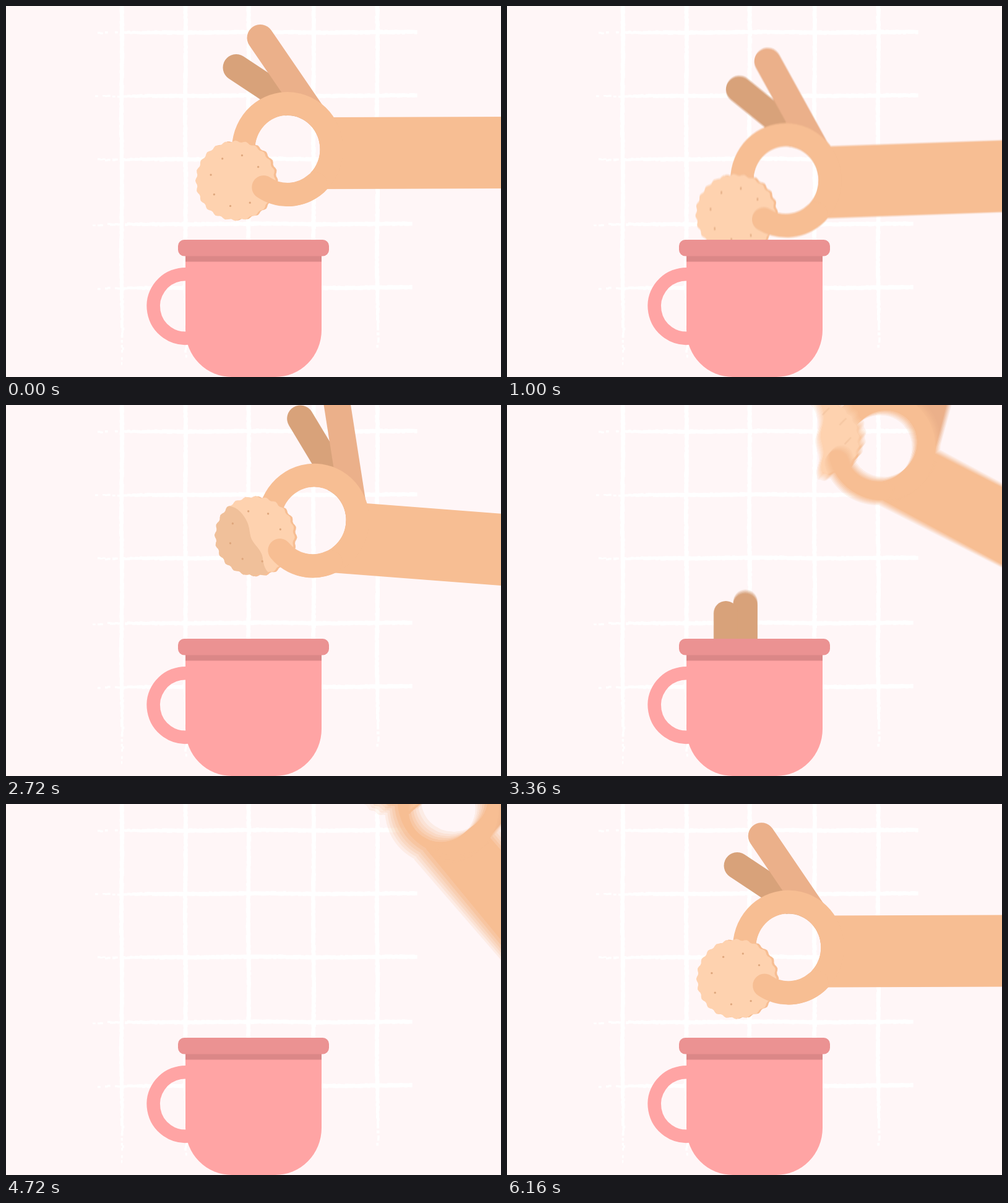
Recreate the animation shown at these times as an HTML page with a canvas. Size 800x600 px, loop 6.2 s.

```html
<!DOCTYPE html>
<html lang="en">
<head>
<meta charset="utf-8">
<title>Cookie dunk</title>
<style>
html, body { margin: 0; width: 100%; height: 100%; overflow: hidden; background: #fff6f7; }
canvas { display: block; width: 800px; height: 600px; }
</style>
</head>
<body>
<canvas id="stage" width="800" height="600"></canvas>
<script>
const LOOP = 6200, RAD = Math.PI / 180;
const SHUTTER = 18, SAMPLES = 6;
const SOAK = 1500, BREAK = 2800, SUNK = 3260, FRESH = 4000;
const COLOR = {
  bg: '#fff6f7', hand: '#f7be93', middle: '#ebb08a', pinky: '#d8a27a',
  cookie: '#fed2af', soaked: '#f0c09a', dot: '#dea67c', tea: '#d8a27a',
  mug: '#ffa4a4', rim: '#eb9292', shade: '#db8787'
};

const screen = document.getElementById('stage').getContext('2d');
const newLayer = () => {
  const c = document.createElement('canvas');
  c.width = 800;
  c.height = 600;
  return c.getContext('2d');
};
const scene = newLayer(), wall = newLayer();

// time, ring x, ring y, arm angle, hand angle, finger spread
const KEYS = [
  [0, 455, 231.5, -0.2, 0, 0],
  [560, 458, 190, 2, 1, 4],
  [1000, 451, 281.5, -2, -2.5, 8],
  [1300, 449, 339, -4, -6, 5],
  [1920, 456, 325, -3.9, -21, 3.5],
  [2000, 457, 323, -3.8, -22, 3],
  [2580, 499, 181, 5, 17.5, 11],
  [2720, 497, 187, 4.4, 16.5, 9],
  [3000, 496, 189, 4.2, 16, 9],
  [3360, 605, 67, 27.5, 40, 9],
  [3760, 930, -150, 56, 66, 4],
  [4600, 930, -150, 56, 70, 4],
  [4720, 715, 0, 50, 66, 8],
  [5100, 439, 249, -2, -4, 12],
  [5350, 449, 236, -0.5, -1, 9],
  [5900, 454, 233.5, -0.2, 0, 4]
];

const mod = (a, n) => ((a % n) + n) % n;
const keyAt = i => KEYS[mod(i, KEYS.length)];
const timeAt = i => keyAt(i)[0] + LOOP * Math.floor(i / KEYS.length);
const slope = (i, k) => (keyAt(i + 1)[k] - keyAt(i)[k]) / (timeAt(i + 1) - timeAt(i));

// Monotone tangent: flat at turning points
function tangent(i, k) {
  const a = slope(i - 1, k), b = slope(i, k);
  return a * b <= 0 ? 0 : 2 * a * b / (a + b);
}

function poseAt(t) {
  let i = KEYS.length - 1;
  while (KEYS[i][0] > t) i--;
  const h = timeAt(i + 1) - timeAt(i), u = (t - timeAt(i)) / h, v = 1 - u;
  const value = k => keyAt(i)[k] * (1 + 2 * u) * v * v + keyAt(i + 1)[k] * u * u * (3 - 2 * u)
    + h * u * v * (tangent(i, k) * v - tangent(i + 1, k) * u);
  return { x: value(1), y: value(2), arm: value(3), hand: value(4), spread: value(5) };
}

function paintWall(c) {
  let seed = 7;
  const rnd = () => (seed = seed * 16807 % 2147483647) / 2147483647;
  c.fillStyle = COLOR.bg;
  c.fillRect(0, 0, 800, 600);
  c.fillStyle = '#fff';
  // Dry brush stroke that thins out towards position `from`
  const brush = (from, to, dab) => {
    const dir = Math.sign(to - from);
    for (let p = from; (to - p) * dir > 0; p += 4 * dir) {
      const f = Math.min(1, Math.abs(p - from) / 130);
      const size = 6 * (0.25 + 0.75 * f) + rnd() * 1.4;
      const off = (rnd() - 0.5) * (2.6 - 1.8 * f) + Math.sin(p / 37) * 0.5;
      if (rnd() < 0.2 + f * 1.6) dab(p, off - size / 2, size, 1 - f);
    }
  };
  [43, 145.5, 248, 353, 456].forEach((y, i) =>
    brush(132, i < 3 ? 662 : 656, (p, o, s, fade) => c.fillRect(p, y + o + fade * 2 - 0.5, 4.6, s)));
  [187, 290, 392, 497, 600].forEach(x =>
    brush(576, -6, (p, o, s, fade) => c.fillRect(x + o + fade, p, s, 4.6)));
}

const hole = new Path2D();
hole.rect(-2000, -2000, 4000, 4000);
hole.ellipse(0, 0, 52.5, 54.5, 0, 0, 7);

const biscuit = new Path2D();
for (let a = 0; a < 360; a += 3) {
  const r = 63.6 + 1.4 * Math.cos(24 * a * RAD);
  biscuit.lineTo(r * Math.cos(a * RAD), r * Math.sin(a * RAD));
}
biscuit.closePath();

const biteLine = 'M-51 -35C-38 -37 -19 -24 -12 -9S-4 7 9 16S22 30 25.6 37S34 49 40 51L46 58';
const soakedSide = new Path2D(biteLine + 'L30 110H-110V-35Z');
const drySide = new Path2D(biteLine + 'L120 110V-110H-70Z');

function within(c, fn) {
  c.save();
  fn();
  c.restore();
}

function line(c, color, width, x1, y1, x2, y2) {
  c.strokeStyle = color;
  c.lineWidth = width;
  c.lineCap = 'round';
  c.beginPath();
  c.moveTo(x1, y1);
  c.lineTo(x2, y2);
  c.stroke();
}

function finger(c, color, px, py, dx, dy, spread) {
  within(c, () => {
    c.translate(px, py);
    c.rotate(spread * RAD);
    line(c, color, 43, 0, 0, dx, dy);
  });
}

function handArc(c, from, to) {
  c.strokeStyle = COLOR.hand;
  c.lineWidth = 38;
  c.lineCap = 'round';
  c.beginPath();
  c.ellipse(0, 0, 71, 73.5, 0, from * RAD, to * RAD);
  c.stroke();
}

function placeHand(c, p) {
  c.translate(p.x, p.y);
  c.rotate(p.hand * RAD);
}

function cookie(c, side, soaked) {
  within(c, () => {
    if (side) c.clip(side);
    c.fillStyle = COLOR.hand;
    c.translate(2.6, -0.6);
    c.fill(biscuit);
    c.translate(-3.6, 0.6);
    c.fillStyle = COLOR.cookie;
    c.fill(biscuit);
    if (soaked) within(c, () => {
      c.clip(biscuit);
      c.fillStyle = COLOR.soaked;
      c.fill(soakedSide);
    });
    c.fillStyle = COLOR.dot;
    for (let i = 0; i < 8; i++) {
      const a = (45 * i - 77) * RAD;
      c.beginPath();
      c.arc(1 + 42 * Math.cos(a), 42 * Math.sin(a), 1.6, 0, 7);
      c.fill();
    }
  });
}

function hand(c, p, t) {
  within(c, () => {
    placeHand(c, p);
    within(c, () => {
      c.clip(hole, 'evenodd');
      finger(c, COLOR.pinky, 53, -42, -136, -90, p.spread);
      finger(c, COLOR.middle, 62, -25, -106, -155, p.spread);
      within(c, () => {
        c.translate(82, 6.5);
        c.rotate((p.arm - p.hand) * RAD);
        c.fillStyle = COLOR.hand;
        c.fillRect(-45, -58, 1000, 116);
      });
      handArc(c, 172, 450);
    });
    within(c, () => {
      c.translate(-83, 51);
      const broken = t > BREAK && t < FRESH;
      cookie(c, broken ? drySide : null, !broken && t > SOAK && t < FRESH);
    });
    handArc(c, 50, 123);
  });
}

function fallingPiece(c, t) {
  if (t <= BREAK || t > SUNK) return;
  const s = (t - BREAK) / 1000;
  within(c, () => {
    c.translate(-30 * s, 1500 * s * s);
    placeHand(c, poseAt(BREAK));
    c.translate(-83, 51);
    c.rotate(-60 * s * RAD);
    cookie(c, soakedSide, true);
  });
}

// Ballistic drop: x and top at the peak, drift in px/s, pull in px/s²
function drop(c, t, peak, x, top, drift, pull) {
  const s = (t - peak) / 1000, y = top + pull * s * s;
  if (t < BREAK || t > 4600 || y > 380) return;
  const length = 20 + 100 * Math.min(1, Math.max(0, -s * 2.2));
  const cx = x + drift * s;
  line(c, COLOR.tea, 39.4, cx, y + 19.7, cx, y + 19.7 + length);
}

function mug(c) {
  c.strokeStyle = COLOR.mug;
  c.lineWidth = 21.5;
  c.lineCap = 'butt';
  c.beginPath();
  c.arc(290, 485.5, 51.8, 80 * RAD, 280 * RAD);
  c.stroke();
  c.fillStyle = COLOR.mug;
  c.fill(new Path2D('M290 400H510V524A75 76 0 0 1 435 600H365A75 76 0 0 1 290 524Z'));
  c.fillStyle = COLOR.shade;
  c.fillRect(290, 400, 220, 13.5);
  c.fillStyle = COLOR.rim;
  c.beginPath();
  c.roundRect(278, 378, 244, 26.5, 10);
  c.fill();
}

function paintScene(c, t) {
  c.drawImage(wall.canvas, 0, 0);
  drop(c, t, 3800, 393.5, 222, 19, 412);
  // The left drop keeps a long tail down into the mug
  const s = (t - 3365) / 1000, top = 317 + 1000 * s * s;
  if (top < 380) line(c, COLOR.tea, 39.4, 353.5 - 60 * s, top + 19.7, 353.5 - 60 * s, 410);
  fallingPiece(c, t);
  hand(c, poseAt(t), t);
  mug(c);
}

// Average several instants for motion blur
function render(t) {
  for (let i = 0; i < SAMPLES; i++) {
    paintScene(scene, mod(t + SHUTTER * (i / (SAMPLES - 1) - 0.5), LOOP));
    screen.globalAlpha = 1 / (i + 1);
    screen.drawImage(scene.canvas, 0, 0);
  }
}

paintWall(wall);
const start = performance.now();
function tick() {
  render((performance.now() - start) % LOOP);
  requestAnimationFrame(tick);
}
tick();
</script>
</body>
</html>
```
